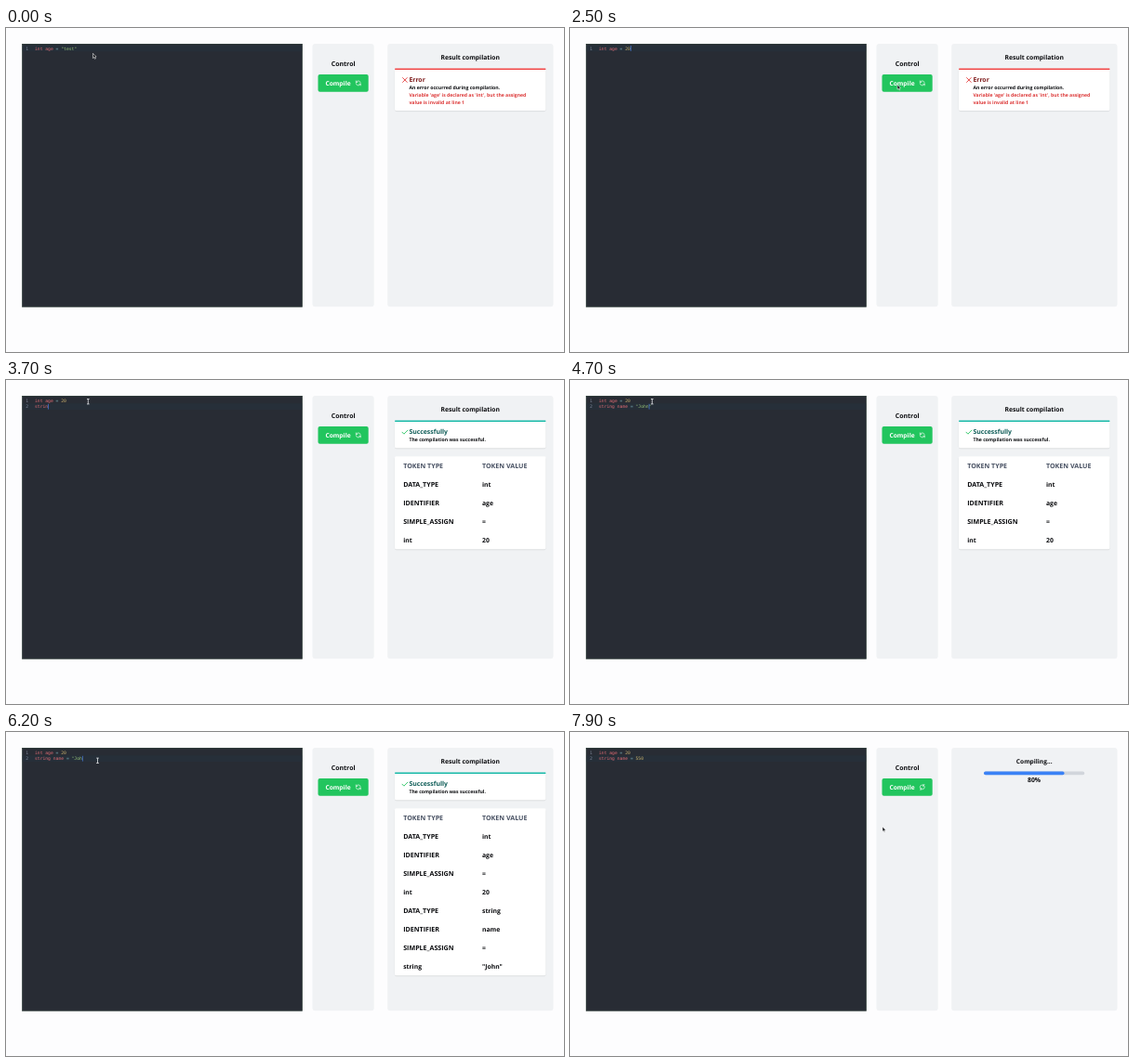
Write an HTML page that moves like this. It is 600 by 349 pixels and loops after 8 s.

```html
<!DOCTYPE html>
<html lang="en">
<head>
<meta charset="utf-8">
<title>Compiler demo</title>
<style>
html, body { margin: 0; width: 100%; height: 100%; overflow: hidden; background: #fdfdfe; }
svg { display: block; width: 600px; height: 349px; }
text { font: 700 6.8px "Open Sans", "Noto Sans", sans-serif; fill: #0b0c0f; text-rendering: geometricPrecision; }
.code text { font: 4.7px "DejaVu Sans Mono", monospace; white-space: pre; }
</style>
</head>
<body>
<svg id="stage" viewBox="0 0 600 349" xmlns="http://www.w3.org/2000/svg"></svg>
<script>
const LOOP = 8000;
const CHAR = 2.83, CODE_X = 31, LINE_Y = 18.5, LINE_H = 6.75;
const STEP = 60, COMPILE = 640;
const RUNS = [2710, 5210, 7390];

const stage = document.getElementById('stage');

function el(parent, tag, attrs = {}, content) {
  const node = document.createElementNS('http://www.w3.org/2000/svg', tag);
  for (const k in attrs) node.setAttribute(k, attrs[k]);
  if (content !== undefined) node.textContent = content;
  parent.appendChild(node);
  return node;
}
const group = parent => el(parent, 'g');
const rect = (p, x, y, width, height, fill, rx = 0) => el(p, 'rect', { x, y, width, height, fill, rx });
function label(p, x, y, str, size = 6.8, fill = '#0b0c0f', anchor = 'start') {
  const node = el(p, 'text', { x, y, 'text-anchor': anchor }, str);
  node.style.fontSize = size + 'px';
  node.style.fill = fill;
  return node;
}
const show = (node, on) => node.setAttribute('visibility', on ? 'visible' : 'hidden');

function card(p, y, h) {
  rect(p, 418, y + 1.2, 162.5, h, '#000', 2).setAttribute('opacity', 0.05);
  rect(p, 417.6, y + 0.5, 163.3, h, '#000', 2).setAttribute('opacity', 0.05);
  rect(p, 418, y, 162.5, h, '#fff', 1.5);
}

// Panels
rect(stage, 0, 0, 600, 349, '#fdfdfe');
rect(stage, 17.3, 17, 301.4, 283.5, '#282c34');
el(stage, 'rect', { x: 17.6, y: 17.3, width: 300.8, height: 282.9, fill: 'none', stroke: '#35453f', 'stroke-width': 0.6 });
rect(stage, 329.5, 17, 66.2, 283.3, '#f0f2f4', 3);
rect(stage, 410.2, 17, 178.3, 283.3, '#f0f2f4', 3);

// Code editor
const active = rect(stage, 17.9, LINE_Y, 300.2, LINE_H, '#262f39');
const code = group(stage);
code.setAttribute('class', 'code');
const lines = [0, 1].map(i => {
  const y = LINE_Y + 5.1 + i * LINE_H;
  const num = el(code, 'text', { x: 24.2, y, 'text-anchor': 'end' }, i + 1);
  num.style.fill = '#7d8799';
  return { num, text: el(code, 'text', { x: CODE_X, y }), value: null };
});
const caret = rect(stage, 0, 0, 0.6, 5.8, '#528bff');

function tint(token) {
  if (token[0] === '"') return '#98c379';
  if (token === '=') return '#7fb5bd';
  return /^\d/.test(token) ? '#c8b06c' : '#e06c75';
}
function setLine(line, value) {
  if (line.value === value) return;
  line.value = value;
  line.text.textContent = '';
  for (const token of value.match(/\s+|\S+/g) || []) {
    el(line.text, 'tspan', {}, token).style.fill = tint(token);
  }
}

// Control panel
label(stage, 362.7, 40.6, 'Control', 6.95, '#0b0c0f', 'middle');
rect(stage, 335.5, 50, 54.2, 18.8, '#22c55e', 2);
label(stage, 343.4, 61.9, 'Compile', 6.7, '#fff');
const icon = el(stage, 'path', {
  d: 'M4 4v5h.6M19.9 11A8 8 0 0 0 4.6 9H9M20 20v-5h-.6A8 8 0 0 1 4.1 13M19.4 15H15',
  fill: 'none', stroke: '#fff', 'stroke-width': 2, 'stroke-linecap': 'round', 'stroke-linejoin': 'round'
});

// Progress view
const busy = group(stage);
label(busy, 499.2, 34.4, 'Compiling...', 6.6, '#0b0c0f', 'middle');
rect(busy, 445, 42.6, 108.2, 3.6, '#d1d5db', 1.8);
const bar = rect(busy, 445, 42.6, 0, 3.6, '#3b82f6', 1.8);
const percent = label(busy, 499, 54.2, '', 6.9, '#0b0c0f', 'middle');

// Result views
const done = group(stage);
label(done, 499.2, 34.4, 'Result compilation', 6.78, '#0b0c0f', 'middle');

function notice(height, edge, title, ink, mark, markInk, note) {
  const g = group(stage);
  card(g, 43.6, height);
  rect(g, 418, 43.5, 162.5, 1.5, edge, 0.7);
  el(g, 'path', { d: mark, fill: 'none', stroke: markInk, 'stroke-width': 0.9, 'stroke-linecap': 'round', 'stroke-linejoin': 'round' });
  label(g, 433.4, 57.7, title, 6.9, ink);
  label(g, 433.4, 66.4, note, 5.18);
  return g;
}
const failure = notice(45.4, '#ef4444', 'Error', '#7f1d1d',
  'M426.6 53.6l4.6 4.8M431.2 53.6l-4.6 4.8', '#e53b3b', 'An error occurred during compilation.');
label(failure, 433.4, 74.3, "Variable 'age' is declared as 'int', but the assigned", 5.12, '#dc3636');
label(failure, 433.4, 82, 'value is invalid at line 1', 5.12, '#dc3636');
const success = notice(29.6, '#14b8a6', 'Successfully', '#115e59',
  'M426 56.2l1.9 2l4 -4', '#22c55e', 'The compilation was successful.');

function table(rows) {
  const g = group(stage);
  card(g, 82.3, 20 * (rows.length + 1));
  [['TOKEN TYPE', 'TOKEN VALUE'], ...rows].forEach(([type, value], i) => {
    const y = 94.9 + i * 19.95, ink = i ? '#0b0c0f' : '#475062';
    label(g, 427.2, y, type, /[A-Z]/.test(type) ? 7.1 : 6.8, ink);
    label(g, 512, y, value, i ? 6.8 : 7.1, ink);
  });
  return g;
}
const tokens = (type, name, value) =>
  [['DATA_TYPE', type], ['IDENTIFIER', name], ['SIMPLE_ASSIGN', '='], [type, value]];
const first = tokens('int', 'age', '20');
const shortTable = table(first);
const longTable = table([...first, ...tokens('string', 'name', '"John"')]);

// Pointers
const arrow = el(stage, 'path', {
  d: 'M0 0V5.2L1.2 4.2L2 6L2.9 5.6L2.1 3.9L3.6 3.7Z',
  fill: '#16181c', stroke: '#fff', 'stroke-width': 0.55, 'stroke-linejoin': 'round'
});
const beam = el(stage, 'path', {
  d: 'M-1.3 -2.7H1.3M0 -2.7V2.7M-1.3 2.7H1.3', fill: 'none', stroke: '#e8eaed', 'stroke-width': 0.8
});

const PATH = [
  [0, 93.5, 27.3], [150, 93.5, 27.3], [450, 77, 23], [600, 77, 23], [800, 44, 35.2],
  [1930, 44, 35.2], [2300, 352, 61], [2740, 352, 61], [3060, 88.3, 23.2],
  [4760, 88.3, 23.2], [5130, 350, 61], [5230, 350, 61], [5400, 301.8, 70.6],
  [5980, 98.5, 30.8], [7180, 98.5, 30.8], [7370, 350, 61], [7480, 350, 61],
  [7900, 336, 102], [8000, 334, 105]
];
function pointerAt(t) {
  const i = PATH.findIndex(p => p[0] > t);
  const [t0, x0, y0] = PATH[i - 1], [t1, x1, y1] = PATH[i];
  const u = (t - t0) / (t1 - t0), e = u * u * (3 - 2 * u);
  return [x0 + (x1 - x0) * e, y0 + (y1 - y0) * e];
}

// Number of keystrokes made since start
const keys = (t, start, gap, max) =>
  t < start ? 0 : Math.min(max, Math.floor((t - start) / gap) + 1);
const inside = (t, spans) => spans.some(([a, b]) => t >= a && t < b);

function firstLine(t) {
  const quoted = '"test"';
  return 'int age = ' + (t < 1750
    ? quoted.slice(0, quoted.length - keys(t, 1200, 80, 6))
    : '20'.slice(0, keys(t, 1790, 90, 2)));
}
function secondLine(t) {
  const head = 'string name = ', full = head + '"John"';
  if (t < 6100) {
    const typed = full.slice(0, keys(t, 3340, 74, 19));
    return { text: typed + (typed.includes('"') ? '"' : ''), at: t < 5300 ? typed.length : full.length };
  }
  const text = t < 7000
    ? full.slice(0, full.length - keys(t, 6130, 52, 6))
    : head + '550'.slice(0, keys(t, 7020, 70, 3));
  return { text, at: text.length };
}

function draw(t) {
  const top = firstLine(t), low = secondLine(t), row = t < 3150 ? 0 : 1;
  setLine(lines[0], top);
  setLine(lines[1], low.text);
  show(lines[1].num, row);
  active.setAttribute('y', LINE_Y + row * LINE_H);
  caret.setAttribute('x', CODE_X + CHAR * (row ? low.at : top.length));
  caret.setAttribute('y', LINE_Y + 0.5 + row * LINE_H);
  show(caret, inside(t, [[550, 2650], [3080, 5180], [6060, 7330]]) &&
    !inside(t, [[1000, 1200], [6700, 6800]]));

  const run = RUNS.find(s => t >= s && t < s + COMPILE);
  const running = run !== undefined;
  const value = running ? Math.min(100, Math.floor((t - run) / STEP) * 10) : 0;
  bar.setAttribute('width', 1.082 * value);
  percent.textContent = value + '%';
  const turn = running ? (t - run) / 6 : 0;
  icon.setAttribute('transform', `translate(378.8 59.4) rotate(${turn}) scale(.31) translate(-12 -12)`);

  show(busy, running);
  show(done, !running);
  show(failure, t < RUNS[0]);
  show(success, !running && t > RUNS[0]);
  show(shortTable, !running && t > RUNS[0] && t < RUNS[1]);
  show(longTable, !running && t > RUNS[1]);

  const [x, y] = pointerAt(t);
  const overText = x > 28 && x < 318 && y > 18 && y < LINE_Y + LINE_H * (row + 1);
  show(beam, overText);
  show(arrow, !overText);
  (overText ? beam : arrow).setAttribute('transform', `translate(${x} ${y})`);
}

const begin = performance.now();
function tick() {
  draw((performance.now() - begin) % LOOP);
  requestAnimationFrame(tick);
}
tick();
</script>
</body>
</html>
```
